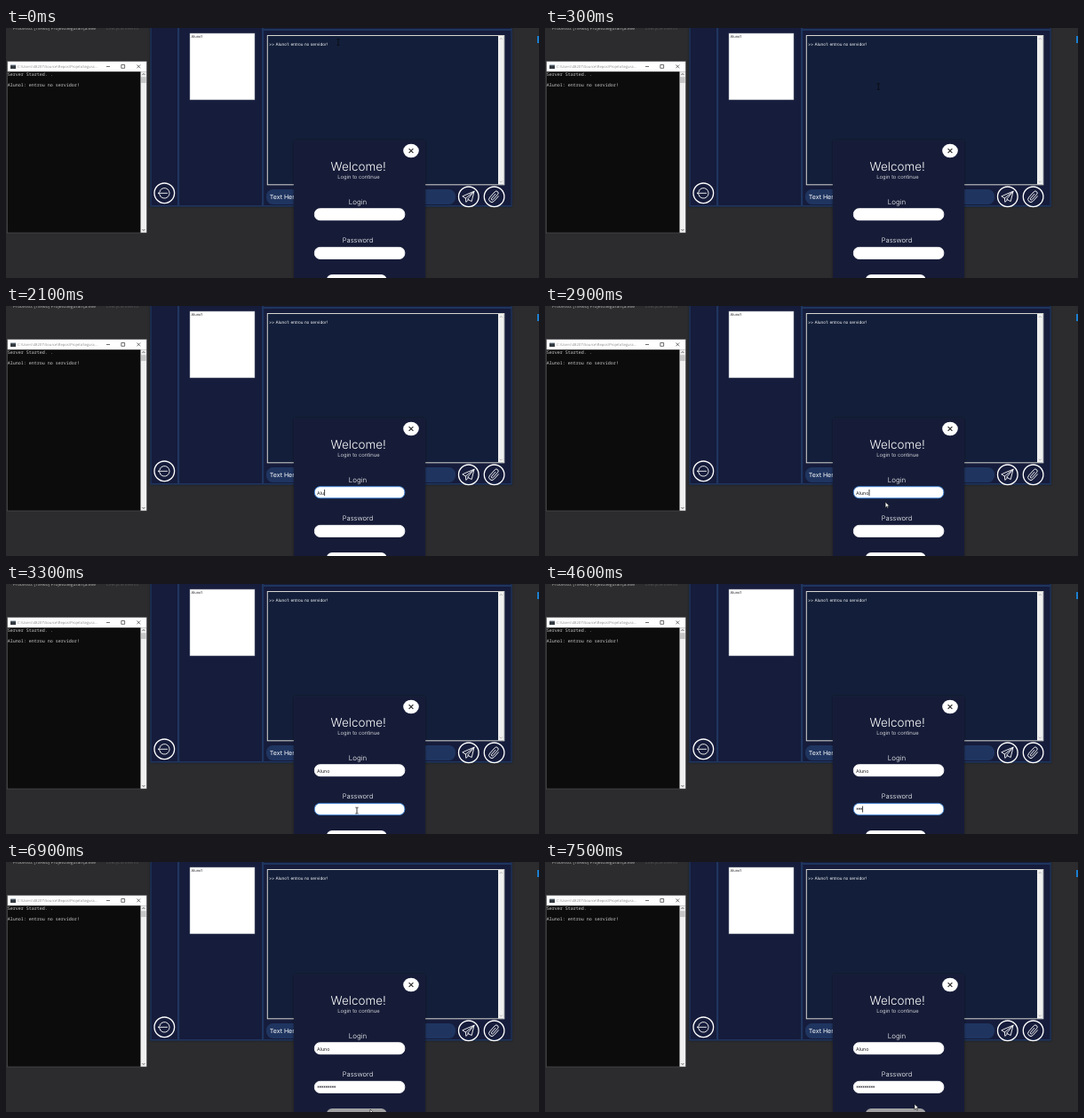
An HTML page for the animation above (8 s loop, 600 px wide and 282 px high).

```html
<!DOCTYPE html>
<html lang="pt">
<head>
<meta charset="utf-8">
<title>Login</title>
<style>
html, body { margin: 0; width: 100%; height: 100%; overflow: hidden; background: #2c2c2e; }
svg { display: block; width: 600px; height: 282px; }
text { font-family: Inter, "Open Sans", sans-serif; fill: #fff; text-rendering: geometricPrecision; white-space: pre; }
.mono { font: 5px "Noto Sans Mono", "DejaVu Sans Mono", monospace; fill: #d2d2d2; }
.ui { font-family: "Open Sans", "Noto Sans", sans-serif; }
.mid { text-anchor: middle; font-weight: 300; }
.ink { fill: #1c1c22; }
.line { fill: none; stroke: #fff; stroke-width: 1; stroke-linejoin: round; stroke-linecap: round; }
.dark { fill: none; stroke: #333; stroke-width: .7; }
</style>
</head>
<body>
<svg viewBox="0 0 600 282">
  <defs>
    <filter id="shade" x="-10%" y="-10%" width="120%" height="120%">
      <feDropShadow dx="0" dy="0" stdDeviation="1.5" flood-color="#000" flood-opacity=".45"/>
    </filter>
  </defs>
  <rect width="600" height="282" fill="#2c2c2e"/>

  <!-- toolbar remains -->
  <text class="ui" x="8" y="1.5" font-size="5" style="fill:#b4b4b4">Processo: [18460] ProjetoSegurança.exe</text>
  <text class="ui" x="113" y="1.5" font-size="5" style="fill:#55555a">Lifecycle Events</text>
  <rect x="598" y="9" width="2" height="8" fill="#1c7fd0"/>

  <!-- chat window -->
  <g filter="url(#shade)"><rect x="162.5" y="-5" width="407" height="206.5" fill="#131f3a"/></g>
  <g fill="#1f365f">
    <rect x="162.5" y="0" width="1.2" height="201"/>
    <rect x="193" y="0" width="2.2" height="201"/>
    <rect x="288" y="0" width="2.2" height="201"/>
    <rect x="289" y="1" width="280" height="2"/>
    <rect x="162.5" y="200" width="407" height="1.5"/>
    <rect x="568.5" y="0" width="1.2" height="201"/>
  </g>
  <rect x="207" y="6" width="73" height="75" fill="#fff" stroke="#8d93a0" stroke-width=".5"/>
  <text class="ink" x="208.6" y="10.6" font-size="4">Aluno1</text>

  <rect x="294.3" y="8.5" width="266.5" height="168.3" fill="#131f3a" stroke="#d6d6d2" stroke-width="1"/>
  <rect x="554" y="9" width="6.5" height="167.4" fill="#f0f0f0"/>
  <path d="M555.8 13l1.5-1.6 1.5 1.6M555.8 172.6l1.5 1.6 1.5-1.6" fill="none" stroke="#aaa" stroke-width=".8"/>
  <text x="296" y="20" font-size="4.65">&gt;&gt; Aluno1: entrou no servidor!</text>

  <rect x="293" y="182" width="213" height="17" rx="7.5" fill="#1f3560"/>
  <text x="296.8" y="193" font-size="7">Text Here</text>

  <g class="line">
    <circle cx="178.3" cy="186.3" r="11.3" stroke-width="1.3"/>
    <path d="M173.2 183.4A5.8 5.8 0 1 1 173.2 189.2M181.5 186.3H171.5M174 183.8l-2.6 2.5 2.6 2.5" stroke-width=".9"/>
    <circle cx="520.8" cy="190.3" r="11.3" stroke-width="1.3"/>
    <path d="M527 184.2L513.8 189.8 517.4 192 527 184.2 524.2 195.6 519.6 193.2 527 184.2M517.4 192L517.8 196.4 520.6 193.8" stroke-width=".9"/>
    <circle cx="549.6" cy="190.3" r="11.3" stroke-width="1.3"/>
    <path transform="translate(549.6 190.3) rotate(42)" stroke-width=".9"
      d="M3.2-3.6V4a3.2 3.2 0 0 1-6.4 0V-4.6a2.2 2.2 0 0 1 4.4 0V3.4a1.1 1.1 0 0 1-2.2 0V-3.2"/>
  </g>

  <!-- console -->
  <rect x="1.5" y="37.5" width="157" height="193.5" fill="#0c0c0c" stroke="#55555a" stroke-width=".6"/>
  <rect x="1.8" y="37.8" width="156.4" height="11.4" fill="#fff"/>
  <rect x="5" y="41" width="6" height="5" fill="#333a40"/>
  <rect x="5" y="41" width="6" height="1.2" fill="#b9c3cc"/>
  <text class="ui" x="13" y="45.2" font-size="4.15" style="fill:#8c8c8c">C:\Users\48207\Source\Repos\ProjetoSegura...</text>
  <path class="dark" d="M113 43.5h4M129.8 41.5h3.8v3.8h-3.8zM147.4 41.5l3.8 3.8M151.2 41.5l-3.8 3.8"/>
  <rect x="151.5" y="49.2" width="6.7" height="181.6" fill="#f0f0f0"/>
  <rect x="152" y="55.2" width="5.7" height="6.8" fill="#c6c6c6"/>
  <path class="dark" d="M153.4 53l1.5-1.6 1.5 1.6M153.4 227l1.5 1.6 1.5-1.6"/>
  <text class="mono" x="1.8" y="54.2">Server Started. .</text>
  <text class="mono" x="1.8" y="66.4">Aluno1: entrou no servidor!</text>

  <!-- login dialog -->
  <g filter="url(#shade)"><rect x="324" y="126.5" width="148" height="170" fill="#131f38"/></g>
  <ellipse cx="456" cy="138.5" rx="8.8" ry="7.8" fill="#fff"/>
  <path d="M453.6 136.1l4.8 4.8M458.4 136.1l-4.8 4.8" stroke="#222" stroke-width="1.1"/>
  <text class="mid" x="396.7" y="160.6" font-size="13.5">Welcome!</text>
  <text class="mid" x="397" y="170" font-size="5.9">Login to continue</text>
  <text class="mid" x="396" y="198.6" font-size="7.9">Login</text>
  <text class="mid" x="396" y="242.4" font-size="7.6">Password</text>
  <rect id="f-user" x="347.4" y="203.7" width="101.4" height="13" rx="6" fill="#fff" stroke-width=".9"/>
  <rect id="f-pass" x="347.4" y="247.4" width="101.4" height="13" rx="6" fill="#fff" stroke-width=".9"/>
  <rect id="button" x="361" y="278" width="67.5" height="13" rx="6"/>
  <text id="user" class="ink" x="350" y="212.8" font-size="5.3"></text>
  <g id="stars" stroke="#1c1c22" stroke-width=".5"></g>
  <rect id="caret" width=".8" height="7" fill="#111"/>

  <path id="beam" d="M-1.6-3.4H-.4L0-3 .4-3.4H1.6M0-3V3M-1.6 3.4H-.4L0 3 .4 3.4H1.6" fill="none" stroke="#0a0a0c" stroke-width=".8"/>
  <path id="arrow" d="M0 0V6.4L1.5 5 2.5 7.2 3.5 6.8 2.5 4.6H4.6Z" fill="#fff" stroke="#111" stroke-width=".6"/>
</svg>
<script>
const LOOP = 8000, NAME = "Aluno", PITCH = 2.32;
const $ = id => document.getElementById(id);
const nameAt = [1700, 1900, 2100, 2200, 2400];
const starAt = [4000, 4400, 4600, 5100, 5300, 5600, 5900, 6200, 6400];
// pointer: runs of [time, x, y]; hidden between runs
const runs = [
  { end: 1700, pts: [[0, 374, 16], [100, 374, 16], [700, 379, 209]] },
  { end: 4000, pts: [[2700, 379, 209], [3300, 395, 255.5]] },
  { end: LOOP, pts: [[6400, 396, 262], [6700, 410, 279], [7100, 410, 279], [7500, 416, 273]] }
];
const ease = u => u * u * (3 - 2 * u);
const count = (list, t) => list.filter(s => t >= s).length;
const show = (el, on) => el.setAttribute("visibility", on ? "visible" : "hidden");

function pointer(t) {
  const run = runs.find(r => t >= r.pts[0][0] && t < r.end);
  if (!run) return null;
  const i = run.pts.findIndex(p => p[0] > t);
  if (i < 0) return run.pts.at(-1).slice(1);
  const a = run.pts[i - 1], b = run.pts[i];
  const u = ease((t - a[0]) / (b[0] - a[0]));
  return [a[1] + (b[1] - a[1]) * u, a[2] + (b[2] - a[2]) * u];
}

const overText = ([x, y]) => y < 127 || (y > 203 && y < 217) || (y > 247 && y < 261);

const stars = starAt.map((_, i) => {
  const p = document.createElementNS("http://www.w3.org/2000/svg", "path");
  p.setAttribute("d", "M0-1.1V1.1M-.95-.55L.95.55M-.95.55L.95-.55");
  p.setAttribute("transform", `translate(${351.6 + i * PITCH} 253.6)`);
  $("stars").append(p);
  return p;
});

function draw(now) {
  const t = Math.floor(now % LOOP / 100) * 100;
  const typed = count(nameAt, t), hidden = count(starAt, t);
  const inUser = t >= 800 && t < 3200, inPass = t >= 3200 && t < 6900;

  $("user").textContent = NAME.slice(0, typed);
  stars.forEach((s, i) => show(s, i < hidden));
  $("f-user").setAttribute("stroke", inUser ? "#3f86d8" : "#fff");
  $("f-pass").setAttribute("stroke", inPass ? "#3f86d8" : "#fff");
  $("button").setAttribute("fill", t >= 6600 ? "#a0a0a2" : "#fff");

  const caret = $("caret");
  show(caret, (inUser && typed > 0) || (inPass && hidden > 0));
  const width = typed ? $("user").getComputedTextLength() : 0;
  caret.setAttribute("x", inPass ? 350.3 + hidden * PITCH : 350.2 + width);
  caret.setAttribute("y", inPass ? 250.5 : 207);

  const pos = pointer(t), text = pos && overText(pos);
  show($("beam"), pos && text);
  show($("arrow"), pos && !text);
  if (pos) $(text ? "beam" : "arrow").setAttribute("transform", `translate(${pos})`);
}

const start = performance.now();
function tick() {
  draw(performance.now() - start);
  requestAnimationFrame(tick);
}
tick();
</script>
</body>
</html>
```
